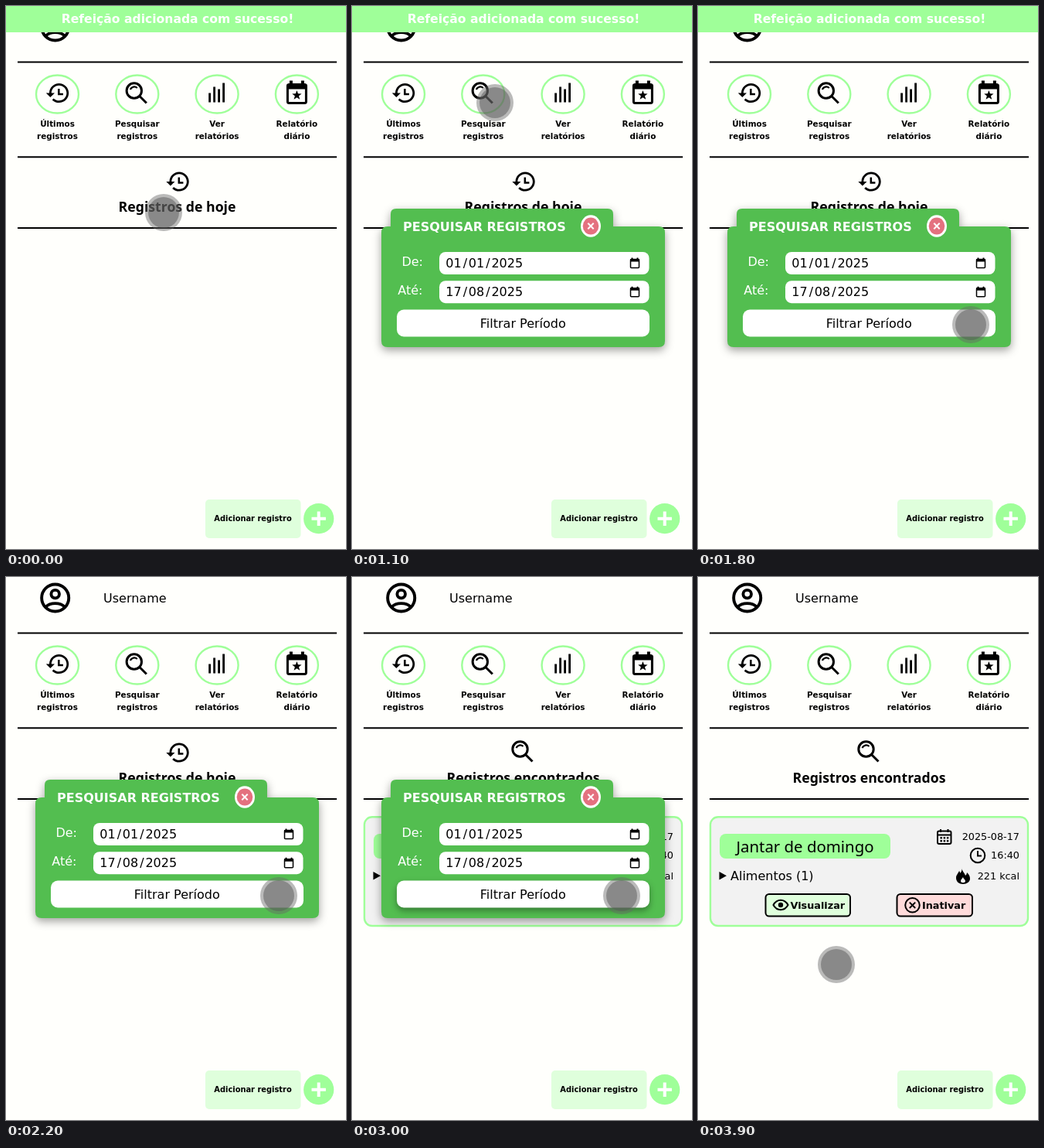
Animation, 440 px wide and 702 px high, one loop 4 s. Source, as an HTML page:

```html
<!DOCTYPE html>
<html lang="pt-BR">
<head>
<meta charset="utf-8">
<title>Pesquisar registros</title>
<style>
  html, body { margin: 0; width: 100%; height: 100%; overflow: hidden; background: #fffffc; }
  svg { display: block; width: 100vw; height: 100vh; }
  text { font: 16px "DejaVu Sans", Verdana, sans-serif; }
  .bold { font-weight: bold; }
  .small { font-size: 10.4px; }
  .data { font-size: 12.8px; }
  .heading { font: bold 17.7px "Noto Sans", sans-serif; }
  .meal { font: 20.4px "Noto Sans", sans-serif; }
  .mid { text-anchor: middle; }
  .end { text-anchor: end; }
  .white { fill: #fff; }
  .green { fill: #9fff99; }
  .pale { fill: #dfffdc; }
  .line { fill: none; stroke: #000; }
  .ring { fill: none; stroke: #9fff99; stroke-width: 2.4; }
  #dialog > .shell { fill: #53be50; filter: drop-shadow(0 4px 6px rgba(0,0,0,.38)); }
  .pressed { filter: drop-shadow(0 4px 4px rgba(0,0,0,.35)); }
</style>
</head>
<body>
<svg viewBox="0 0 440 702">
  <defs>
    <g id="history" transform="scale(1.4) translate(-11.5 -12)">
      <path d="M13 3c-4.97 0-9 4.03-9 9H1l4 4 4-4H6c0-3.87 3.13-7 7-7s7 3.13 7 7-3.13 7-7 7c-1.93 0-3.68-.79-4.94-2.06l-1.42 1.42C8.27 19.99 10.51 21 13 21c4.97 0 9-4.03 9-9s-4.03-9-9-9z"/>
      <path class="line" stroke-width="1.8" d="M12.8 8v5h4"/>
    </g>
    <g id="search" class="line" stroke-width="3">
      <circle cx="-3" cy="-3" r="9.7"/>
      <path d="M4 4 13 13"/>
      <path stroke-width="2.2" d="M-8 -4.5A5.5 5.5 0 0 1 1 -6.5"/>
    </g>
    <path id="bars" class="line" stroke-width="2.8" d="M-9.5 12V0M-3.5 12V-8M2.5 12V-5M8.5 12V-13"/>
    <g id="event">
      <rect class="line" stroke-width="3" x="-12" y="-11" width="24" height="24" rx="2"/>
      <path d="M-13 -11H13V-5H-13ZM-9.5 -16h4v5h-4zM5.5 -16h4v5h-4z"/>
      <path id="star"/>
    </g>
    <g id="picker">
      <rect class="line" stroke-width="1.5" x="-5.5" y="-5" width="11" height="11" rx="1"/>
      <path d="M-6 -5.5H6V-2H-6ZM-4.5 -7h2v2h-2zM2.5 -7h2v2h-2z"/>
    </g>
  </defs>

  <g id="profile" transform="translate(63.7 27) scale(1.95) translate(-12 -12)">
    <g class="line" stroke-width="2">
      <circle cx="12" cy="12" r="9"/>
      <circle cx="12" cy="9.5" r="2.7"/>
      <path d="M5.7 18C8.5 14.9 15.5 14.9 18.3 18"/>
    </g>
  </g>
  <text x="126" y="33">Username</text>
  <path class="line" stroke-width="2" d="M15 72.5H428M15 195.3H428M15 287H428"/>
  <g id="menu"></g>

  <g id="today">
    <use href="#history" x="222" y="227"/>
    <text class="heading mid" x="221.5" y="266">Registros de hoje</text>
  </g>

  <g id="found">
    <use href="#search" x="220.5" y="225.5"/>
    <text class="heading mid" x="221.5" y="266">Registros encontrados</text>
    <rect x="16" y="310.3" width="411" height="140.7" rx="10" fill="#f2f2f2" stroke="#9fff99" stroke-width="2.4"/>
    <rect class="green" x="28" y="332" width="221" height="32" rx="8"/>
    <text class="meal mid" x="138.5" y="356">Jantar de domingo</text>
    <path d="M27.5 381 37 386.3 27.5 391.6Z"/>
    <text x="42" y="392">Alimentos (1)</text>
    <g class="bold">
      <text class="data end" x="416" y="340">2025-08-17</text>
      <text class="data end" x="416" y="364">16:40</text>
      <text class="data end" x="416" y="391">221 kcal</text>
    </g>
    <g class="line" stroke-width="2">
      <rect x="310" y="328.5" width="17.5" height="16.5" rx="2"/>
      <path d="M310 333.5H327.5M314 326v4M323.5 326v4"/>
      <path stroke-width="2.4" stroke-dasharray="2.4 1.8" d="M313.5 337.3h11M313.5 341.3h11"/>
      <circle cx="362" cy="360" r="9.3"/>
      <path d="M362 354v6.5h5"/>
    </g>
    <path d="M341 376c1 5 4 6 5 10 1-1 2-2 2-4 3 3 4 5 4 8 0 4-4 7-9 7s-9-3-9-8c0-4 3-6 4-9 1 1 1 2 1 3 2-2 3-4 2-7z"/>
    <path fill="#f2f2f2" d="M343 388c0 2 3 3 3 5 0 3-6 3-6 0 0-2 2-3 3-5z"/>
    <g stroke="#000" stroke-width="2">
      <rect class="pale" x="87.5" y="410" width="109.5" height="28.5" rx="4.5"/>
      <rect fill="#ffdada" x="257.5" y="410" width="97.5" height="28.5" rx="4.5"/>
    </g>
    <g class="line" stroke-width="2">
      <path d="M97.5 424C102 415.7 112 415.7 116.5 424 112 432.3 102 432.3 97.5 424Z"/>
      <circle cx="277.5" cy="424.3" r="9.3"/>
      <path d="m273.8 420.6 7.4 7.4m0-7.4-7.4 7.4"/>
    </g>
    <circle cx="107" cy="424" r="3.2"/>
    <text class="data bold" x="119.5" y="429">Visualizar</text>
    <text class="data bold" x="290" y="429">Inativar</text>
  </g>

  <rect class="pale" x="258" y="638" width="123.5" height="50" rx="5"/>
  <text class="bold mid" style="font-size:9.9px" x="319.5" y="666">Adicionar registro</text>
  <circle class="green" cx="404.7" cy="662.7" r="19.6"/>
  <path stroke="#fff" stroke-width="4" d="M395.5 662.7h18.4M404.7 653.5v18.4"/>

  <g id="dialog">
    <path class="shell" d="M50 285V269q0-7 7-7H331q7 0 7 7V285H397q8 0 8 8V433q0 8-8 8H46q-8 0-8-8V293q0-8 8-8Z"/>
    <text class="bold white" x="66" y="291">PESQUISAR REGISTROS</text>
    <ellipse class="white" cx="309" cy="284.5" rx="13" ry="14.3"/>
    <ellipse id="close" cx="309" cy="284.5" rx="10.3" ry="11"/>
    <path stroke="#fff" stroke-width="2" d="m305.3 280.8 7.4 7.4m0-7.4-7.4 7.4"/>
    <text class="white end" x="92" y="336">De:</text>
    <text class="white end" x="91.5" y="373">Até:</text>
    <g id="fields"></g>
    <rect id="filter" class="white" x="58" y="392.5" width="327" height="35" rx="9"/>
    <text class="mid" x="221.3" y="416">Filtrar Período</text>
  </g>

  <g id="banner">
    <rect class="green" width="440" height="34"/>
    <text class="bold white mid" style="font-size:15.6px" x="222" y="22">Refeição adicionada com sucesso!</text>
  </g>

  <g id="cursor">
    <circle r="24" fill="#666" fill-opacity=".45"/>
    <circle r="20" fill="#5a5a5a" fill-opacity=".5"/>
  </g>
</svg>
<script>
const LOOP = 4000, STEP = 100;
const $ = id => document.getElementById(id);

const menu = [
  ["history", "Últimos", "registros"],
  ["search", "Pesquisar", "registros"],
  ["bars", "Ver", "relatórios"],
  ["event", "Relatório", "diário"],
];
$("menu").innerHTML = menu.map(([icon, top, bottom], i) => {
  const x = 66.5 + i * 103.3;
  return `<ellipse class="ring" cx="${x}" cy="114" rx="27.5" ry="24.5"/>
    <use href="#${icon}" x="${x - (icon === "search" ? 1 : 0)}" y="112.5"/>
    <text class="bold small mid" x="${x}" y="156">${top}</text>
    <text class="bold small mid" x="${x}" y="172">${bottom}</text>`;
}).join("");

$("fields").innerHTML = ["01/01/2025", "17/08/2025"].map((date, i) => {
  const y = 318 + i * 37.2;
  return `<rect class="white" x="113" y="${y}" width="271.5" height="29" rx="8"/>
    <text x="121.3" y="${y + 20}" dx="0 0 2 1.8 0 2 1.8">${date}</text>
    <use href="#picker" x="366" y="${y + 14.5}"/>`;
}).join("");

let star = "";
for (let i = 0; i < 10; i++) {
  const radius = i % 2 ? 2.7 : 6.5, angle = (i / 5 - 0.5) * Math.PI;
  star += `${i ? "L" : "M"}${radius * Math.cos(angle)} ${3 + radius * Math.sin(angle)}`;
}
$("star").setAttribute("d", star + "Z");

// Cursor path: time, x, y
const path = [
  [0, 204, 267], [500, 185, 125], [1200, 185, 125], [1800, 353, 412],
  [2400, 353, 412], [2700, 349, 412], [3000, 349, 412], [3500, 326, 291],
  [3600, 326, 291], [3900, 179, 501],
];

function cursorAt(t) {
  const next = path.findIndex(key => key[0] > t);
  if (next < 0) return path[path.length - 1].slice(1);
  const [t0, x0, y0] = path[next - 1], [t1, x1, y1] = path[next];
  const p = (t - t0) / (t1 - t0), ease = p * p * (3 - 2 * p);
  return [x0 + (x1 - x0) * ease, y0 + (y1 - y0) * ease];
}

const show = (id, visible) => { $(id).style.display = visible ? "" : "none"; };

function draw(now) {
  const t = Math.floor(now % LOOP / STEP) * STEP;
  const closing = t >= 3500;
  show("banner", t < 1900);
  show("dialog", t >= 800 && t < 3700);
  show("today", t < 2900);
  show("found", t >= 2900);
  $("close").setAttribute("fill", closing ? "#c95560" : "#e4717f");
  $("filter").classList.toggle("pressed", t >= 2900);
  $("cursor").setAttribute("transform", `translate(${cursorAt(t).join(" ")})`);
  // The pointer darkens while pressing the close button
  const pressing = closing && t < 3700;
  const [halo, core] = $("cursor").children;
  halo.setAttribute("fill-opacity", pressing ? 0 : 0.45);
  core.setAttribute("fill", pressing ? "#123c14" : "#5a5a5a");
  core.setAttribute("fill-opacity", pressing ? 0.6 : 0.5);
  requestAnimationFrame(draw);
}
requestAnimationFrame(draw);
</script>
</body>
</html>
```
